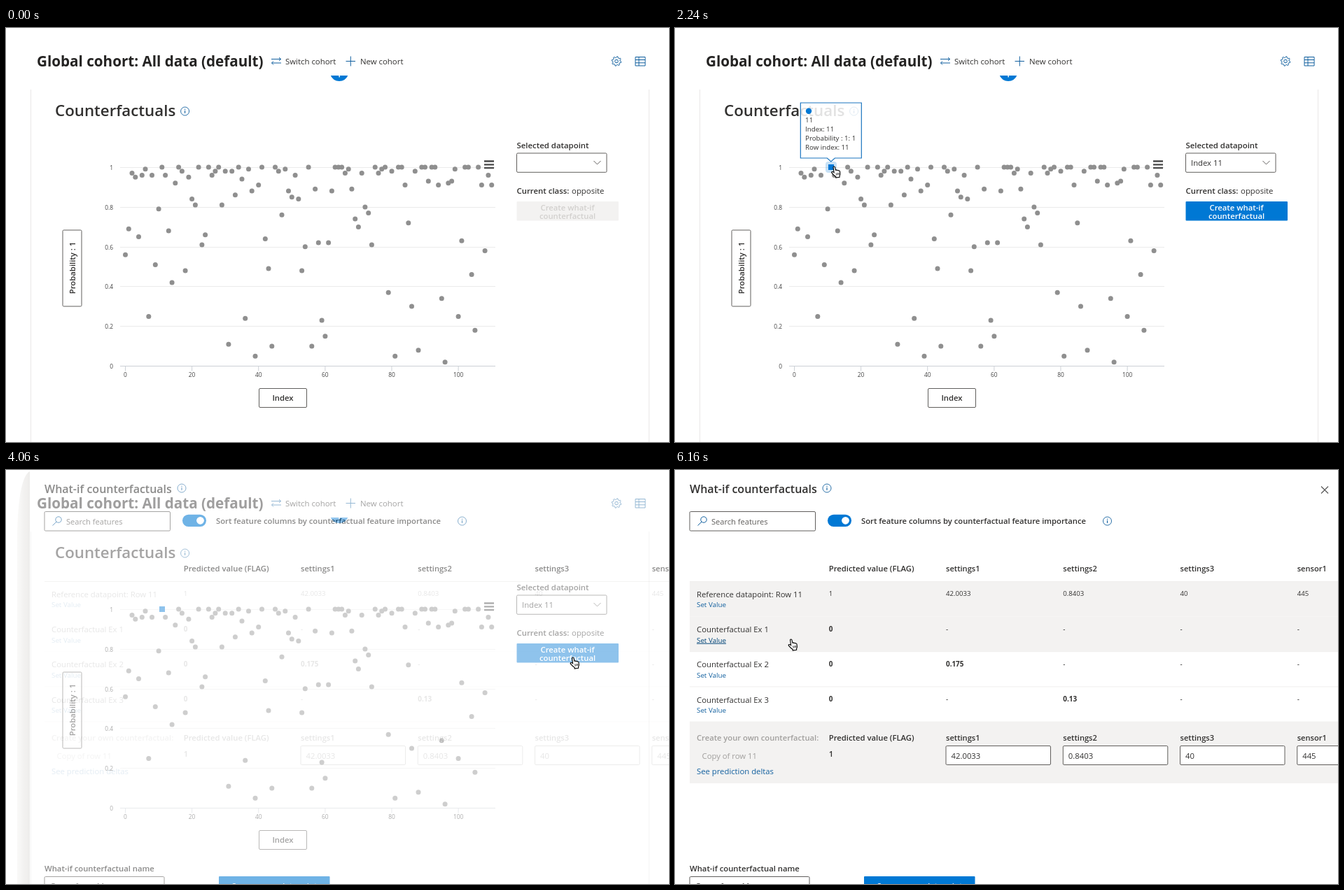
An HTML page for the animation above (8 s loop, 947 px wide and 592 px high).

```html
<!DOCTYPE html>
<html lang="en">
<head>
<meta charset="utf-8">
<title>Counterfactuals</title>
<style>
html, body { margin: 0; width: 100%; height: 100%; overflow: hidden; background: #fff; }
svg { display: block; width: 100%; height: 100%; }
text { font-family: "Open Sans", "Noto Sans", sans-serif; white-space: pre; }
</style>
</head>
<body>
<svg id="stage" viewBox="0 0 947 592"></svg>
<script>
const LOOP = 8000, STEP = 70;
const BLUE = '#0078d4', INK = '#323130', GRAY = '#f3f2f1', LINK = '#12609f', EDGE = '#605e5c';

// Probability of each row, in percent
const probs = [
  56, 69, 97, 95, 65, 96, 99, 25, 96, 51, 79, 100, 96, 68, 42, 92, 100, 98, 48, 95,
  84, 81, 100, 61, 66, 100, 96, 98, 100, 81, 98, 11, 98, 86, 100, 94, 24, 99, 88, 5,
  91, 100, 64, 49, 10, 100, 98, 76, 99, 88, 85, 96, 84, 48, 60, 100, 10, 89, 62, 23,
  15, 62, 88, 100, 100, 100, 97, 99, 89, 74, 70, 97, 80, 77, 61, 100, 97, 99, 100, 37,
  98, 5, 100, 100, 91, 72, 30, 98, 8, 100, 100, 93, 100, 100, 91, 34, 2, 92, 93, 99,
  25, 63, 100, 100, 46, 18, 100, 91, 58, 96, 91];
const points = probs.map((p, i) => ({ x: 170.5 + 4.756 * i, y: 483.5 - 2.845 * p }));

// Cursor stops: time, x, y
const path = [
  [70, 857, 572], [280, 600, 240], [490, 330, 51], [630, 223, 140], [770, 238, 203],
  [910, 238, 203], [1050, 237.5, 195], [1260, 237.5, 195], [1330, 240, 197], [1400, 240, 197],
  [1610, 227.5, 198], [2240, 227.5, 198], [2800, 810, 268], [4760, 810, 268],
  [5040, 110, 374], [5110, 103, 366], [5460, 103, 366], [5740, 130, 281],
  [5810, 130, 281], [6160, 166, 242]];

const clamp = v => Math.max(0, Math.min(1, v));
const mix = (a, b, k) => a + (b - a) * k;
const smooth = k => k * k * (3 - 2 * k);

const text = (x, y, s, o = {}) =>
  `<text x="${x}" y="${y}" font-size="${o.size || 11.3}" font-weight="${o.w || 400}" fill="${o.fill || INK}"` +
  ` text-anchor="${o.anchor || 'start'}" ${o.more || ''}>${s}</text>`;
const bold = (x, y, s, o = {}) => text(x, y, s, { w: 600, ...o });
const rect = (x, y, w, h, fill, more = '') =>
  `<rect x="${x}" y="${y}" width="${w}" height="${h}" fill="${fill}" ${more}/>`;
const frame = (x, y, w, h, r = 1.5) =>
  rect(x, y, w, h, '#fff', `rx="${r}" stroke="${EDGE}" stroke-width="1"`);
const line = (d, stroke, w = 1, more = '') =>
  `<path d="${d}" fill="none" stroke="${stroke}" stroke-width="${w}" ${more}/>`;
const info = (x, y) =>
  `<circle cx="${x}" cy="${y}" r="6" fill="none" stroke="${LINK}" stroke-width=".9"/>` +
  line(`M${x} ${y - 1}v4M${x} ${y - 3.2}v1.2`, LINK, 1.1);

function gear(x, y) {
  let d = '';
  for (let i = 0; i < 32; i++) {
    const r = i % 4 < 2 ? 6.8 : 5.1, a = (i + .5) * Math.PI / 16;
    d += `${i ? 'L' : 'M'}${(x + r * Math.cos(a)).toFixed(2)} ${(y + r * Math.sin(a)).toFixed(2)}`;
  }
  return line(d + 'Z', LINK, 1) + `<circle cx="${x}" cy="${y}" r="2.3" fill="none" stroke="${LINK}"/>`;
}

function chart() {
  let s = '';
  for (let i = 0; i <= 5; i++) {
    const y = Math.floor(483.5 - 56.8 * i) + .5;
    s += line(`M163 ${y}H699`, i ? '#ebebeb' : '#ccd0d6') +
      text(153, y + 3, i ? (i / 5).toString() : '0', { size: 8.4, anchor: 'end', fill: '#444' });
    const x = 170.5 + 95.12 * i;
    s += line(`M${x} 483.5v7`, '#ccd0d6') +
      text(x, 498.5, i * 20, { size: 8.4, anchor: 'middle', fill: '#444' });
  }
  points.forEach((p, i) => {
    s += `<circle id="pt${i}" cx="${p.x.toFixed(1)}" cy="${p.y.toFixed(1)}" r="3.5" fill="#8f8f8f"/>`;
  });
  return s + rect(219, 195, 8, 8, BLUE, 'id="picked"') +
    line('M683 190.5h14M683 195.3h14M683 200.1h14', '#4a4a4a', 2.3);
}

const page = () =>
  text(44, 54.5, 'Global cohort: All data (default)', { size: 20.65, w: 700, fill: '#242322' }) +
  line('M379 44.5h13.5M390 42l2.5 2.5l-2.5 2.5M393 50h-13.5M382 47.5l-2.5 2.5l2.5 2.5', LINK) +
  text(399, 52, 'Switch cohort', { size: 11.4 }) +
  line('M485.5 47.5h13.5M492.3 40.5v14', LINK) +
  text(506, 52, 'New cohort', { size: 11.4 }) +
  gear(872, 47.5) +
  line('M899 41.5h14v12.5h-14zM899 45.5h14M899 49.8h14M904 41.5v12.5', LINK) +
  `<path d="M463.8 68h24.5a13.4 13.4 0 0 1 -24.5 0z" fill="${BLUE}"/>` + rect(475.4, 68, 1.5, 2.4, '#fff') +
  line('M35.5 88V592M918.5 88V592', '#e9e8e7') +
  bold(70, 126, 'Counterfactuals', { size: 22.3 }) + info(255.6, 119) +
  frame(81, 289, 27, 109) +
  bold(0, 0, 'Probability : 1', { anchor: 'middle', more: 'transform="translate(99 343)rotate(-90)"' }) +
  frame(361.5, 515.5, 68, 27) + bold(395.5, 533.2, 'Index', { anchor: 'middle' }) +
  chart() +
  bold(729.5, 171.5, 'Selected datapoint', { size: 11.4 }) +
  frame(729.5, 179, 128.5, 27.3) + line('M839.5 190l5 5l5 -5', '#605e5c') +
  text(737, 197, 'Index 11', { more: 'id="choice"' }) +
  bold(729.5, 236.5, 'Current class:', { size: 11.4 }) + text(808, 236.5, 'opposite', { size: 11.4 }) +
  rect(729.5, 248, 145.5, 27.5, GRAY, 'rx="1" id="button"') +
  `<g id="caption">` + ['Create what-if', 'counterfactual'].map((s, i) =>
    bold(802, 260.6 + 12 * i, s, { anchor: 'middle', fill: 'inherit' })).join('') + '</g>' +
  `<g id="tip"><path id="tipBox" fill="#fff" fill-opacity=".86" stroke="#1b75bf" stroke-width="1.2"/>` +
  `<g id="tipText"></g></g>`;

const cols = [387, 554.3, 721.5, 888.7];
const names = ['settings1', 'settings2', 'settings3', 'sensor1'];
const values = ['42.0033', '0.8403', '40', '445'];
const rowTop = r => 159.5 + 50.2 * r;

const bands = () =>
  rect(21, 159.5, 926, 50.2, GRAY) + rect(21, 360, 926, 88, GRAY) +
  [1, 2, 3].map(r => rect(21, rowTop(r), 926, 50.2, GRAY, `id="row${r}"`)).join('');

function rows() {
  let s = text(31, 182, 'Reference datapoint: Row 11') +
    text(31, 196.3, 'Set Value', { size: 9.8, fill: LINK }) + text(219.7, 180.3, '1', { size: 9.6 });
  cols.forEach((x, c) => s += text(x, 180.3, values[c], { size: 9.6 }));
  for (let r = 1; r <= 3; r++) {
    const y = rowTop(r);
    s += line(`M21 ${y + 50}H947`, '#f0efee') +
      text(31, y + 22.5, 'Counterfactual Ex ' + r) +
      text(31, y + 37, 'Set Value', { size: 9.8, fill: LINK, more: `id="set${r}"` }) +
      text(219.7, y + 21, '0', { size: 9.9, w: 700 });
    cols.forEach((x, c) => {
      const changed = r === c + 2 && c < 2;
      s += text(x, y + 21, changed ? ['0.175', '0.13'][c] : '-', { size: 9.9, w: changed ? 700 : 400 });
    });
  }
  s += bold(31, 387, 'Create your own counterfactual:', { size: 11.2, fill: '#a19f9d' }) +
    text(38.5, 413, 'Copy of row 11', { fill: '#a19f9d' }) +
    text(31, 434.6, 'See prediction deltas', { fill: LINK }) +
    bold(219.7, 387, 'Predicted value (FLAG)') + bold(219.7, 410, '1');
  cols.forEach((x, c) => s += bold(x, 387, names[c], { size: 11.1 }) +
    frame(x, 394.5, 149.5, 27) + text(x + 7.5, 413, values[c]));
  return s;
}

const panel = () =>
  rect(0, 0, 947, 592, '#fff') +
  bold(21, 33, 'What-if counterfactuals', { size: 16 }) + info(217, 26) +
  line('M923 23.5l10 10M933 23.5l-10 10', '#555', 1.1) +
  frame(21, 59.5, 179.5, 27.5) +
  `<circle cx="41" cy="71" r="4.2" fill="none" stroke="${LINK}"/>` + line('M38 74l-5.5 5.5', LINK) +
  text(52, 78, 'Search features', { size: 11.1, fill: '#605e5c' }) +
  rect(218, 63.7, 34, 17.2, BLUE, 'rx="8.6"') + '<circle cx="243.5" cy="72.3" r="5.4" fill="#fff"/>' +
  bold(266, 76.8, 'Sort feature columns by counterfactual feature importance', { size: 11.25 }) +
  info(617.5, 73) +
  bold(219.7, 144.6, 'Predicted value (FLAG)') +
  cols.map((x, c) => bold(x, 144.6, names[c], { size: 11.1 })).join('') +
  line('M21 159.5H947', '#edebe9') +
  `<g id="bands">${bands()}</g><g id="rows">${rows()}</g>` +
  bold(21, 573.6, 'What-if counterfactual name') +
  frame(21, 581.5, 171, 28) + text(29, 599, 'Copy of row 11') +
  rect(270, 581, 158.5, 28, BLUE, 'rx="1"') +
  bold(349.5, 599, 'Save as new datapoint', { anchor: 'middle', fill: '#fff' });

const hand = 'M-1.4 1.4Q-1.6 0 -.3 0Q.8 0 1 1.2L1.9 5.2Q3.2 4.5 4 5.6Q5.2 4.8 6.1 6Q7.6 5.6 8 7.2' +
  'L8.4 10.3Q8.5 12 7.6 13.2V15.2L2.2 16V14.4Q-.6 13 -3.6 9.2Q-4.2 8 -3.2 7.6Q-2 7.3 -.4 8.6Z';

const $ = id => document.getElementById(id);
const set = (el, a) => { for (const k in a) el.setAttribute(k, a[k]); };
const show = (el, on) => el.setAttribute('visibility', on ? 'visible' : 'hidden');

$('stage').innerHTML =
  '<defs><linearGradient id="shade"><stop offset="0" stop-color="#e9e7e4" stop-opacity=".5"/>' +
  '<stop offset="1" stop-color="#dedcd9"/></linearGradient></defs>' +
  rect(0, 0, 947, 592, '#fff') + `<g id="page">${page()}</g>` +
  '<g id="panel"><path d="M-18 592V90Q-16 10 0 2V592Z" fill="url(#shade)"/>' + panel() + '</g>' +
  '<g id="cursor"><path id="arrow" d="M0 0V12.6L2.9 10L5 14.2L7.1 13.2L5.1 9.2H9.2Z" fill="#000" stroke="#fff" stroke-width=".8"/>' +
  `<g id="hand"><path d="${hand}" fill="#fff" stroke="#000" stroke-width="1.1"/>` +
  line('M2.6 9.6l.7 3M4.6 9.2l.6 3M6.5 9l.3 2.8', '#000', .8) + '</g></g>';

function cursorAt(t) {
  let i = 0;
  while (i < path.length - 2 && t >= path[i + 1][0]) i++;
  const [a, b] = [path[i], path[i + 1]];
  const k = smooth(clamp((t - a[0]) / (b[0] - a[0])));
  return { x: mix(a[1], b[1], k), y: mix(a[2], b[2], k) };
}

function nearest(c) {
  const far = p => Math.hypot(p.x - c.x, p.y - c.y);
  return points.reduce((best, p, i) => far(p) < far(points[best]) ? i : best, 0);
}

function hovered(t, c) {
  if (t < 1470) return 16;
  if (t < 2310) return 11;
  return c.x > 700 ? 110 : nearest(c);
}

function drawTip(t, c) {
  const on = t >= 1330 && t < 3290;
  show($('tip'), on);
  if (!on) return;
  const i = hovered(t, c), value = String(probs[i] / 100);
  const w = 87 + 4.5 * (value.length - 1), h = 79;
  let px = points[i].x;
  if (t >= 1470 && t < 1680) px = mix(points[16].x, px, smooth((t - 1400) / 280));
  const mid = Math.min(px, 742 - w / 2), x = mid - w / 2, y = points[i].y - 13 - h;
  set($('tip'), { opacity: clamp((t - 1260) / 140) * clamp((3290 - t) / 280) });
  set($('tipBox'), { d: `M${x} ${y}h${w}v${h}H${mid + 5.5}l-5.5 5l-5.5 -5H${x}Z` });
  const lines = [i, 'Index: ' + i, 'Probability : 1: ' + value, 'Row index: ' + i];
  $('tipText').innerHTML = `<circle cx="${x + 11.7}" cy="${y + 11.8}" r="4.2" fill="${BLUE}"/>` +
    lines.map((s, n) => text(x + 6.8, y + 28.2 + 12.9 * n, s, { size: 9.7 })).join('');
}

function draw(now) {
  const t = Math.floor((now % LOOP) / STEP) * STEP;
  const c = cursorAt(t);

  const picked = t >= 1960;
  show($('picked'), picked);
  show($('choice'), picked);
  show($('pt11'), !picked);
  const halo = t >= 1330 && t < 2730 && c.x <= 700 ? hovered(t, c) : -1;
  points.forEach((p, i) => set($('pt' + i), i === halo
    ? { stroke: '#8f8f8f', 'stroke-width': 9, 'stroke-opacity': .25 } : { stroke: 'none' }));
  set($('picked'), halo === 11
    ? { stroke: BLUE, 'stroke-width': 8, 'stroke-opacity': .22, 'stroke-linejoin': 'round' } : { stroke: 'none' });

  const onButton = picked && t < 4830 && c.x > 729 && c.x < 875 && c.y > 248 && c.y < 276;
  const press = t >= 3850 && t < 4060;
  const hot = onButton && t < 4060;
  set($('button'), { fill: !picked ? GRAY : press ? '#005a9e' : hot ? '#106ebe' : BLUE });
  set($('caption'), { fill: picked ? '#fff' : '#d2d0ce' });
  drawTip(t, c);

  // Side panel slides in while its rows fade up later
  const s = t - 4060;
  show($('panel'), s >= 0);
  set($('panel'), {
    transform: `translate(${s < 490 ? (34 * Math.exp(-s / 75)).toFixed(2) : 0} 0)`,
    opacity: mix(.56, 1, clamp(s / 210))
  });
  const fade = smooth(clamp(s / 490));
  set($('bands'), { opacity: fade });
  set($('rows'), { opacity: mix(.2, 1, fade) });
  show($('page'), s < 490);

  let onLink = false;
  for (let r = 1; r <= 3; r++) {
    const dy = c.y - rowTop(r);
    const over = t >= 4830 && dy >= 0 && dy < 50.2;
    const link = over && dy > 26 && dy < 42 && c.x < 206;
    onLink = onLink || link;
    set($('row' + r), { fill: over ? GRAY : '#fff' });
    set($('set' + r), { 'text-decoration': link ? 'underline' : 'none', fill: link ? '#004578' : LINK });
  }

  const pointing = (t >= 1330 && t < 2380) || onButton || onLink;
  set($('cursor'), { transform: `translate(${c.x.toFixed(2)} ${c.y.toFixed(2)})` });
  show($('cursor'), t >= 70);
  set($('arrow'), { display: pointing ? 'none' : 'inline' });
  set($('hand'), { display: pointing ? 'inline' : 'none' });
}

const start = performance.now();
function tick() {
  draw(performance.now() - start);
  requestAnimationFrame(tick);
}
tick();
</script>
</body>
</html>
```
